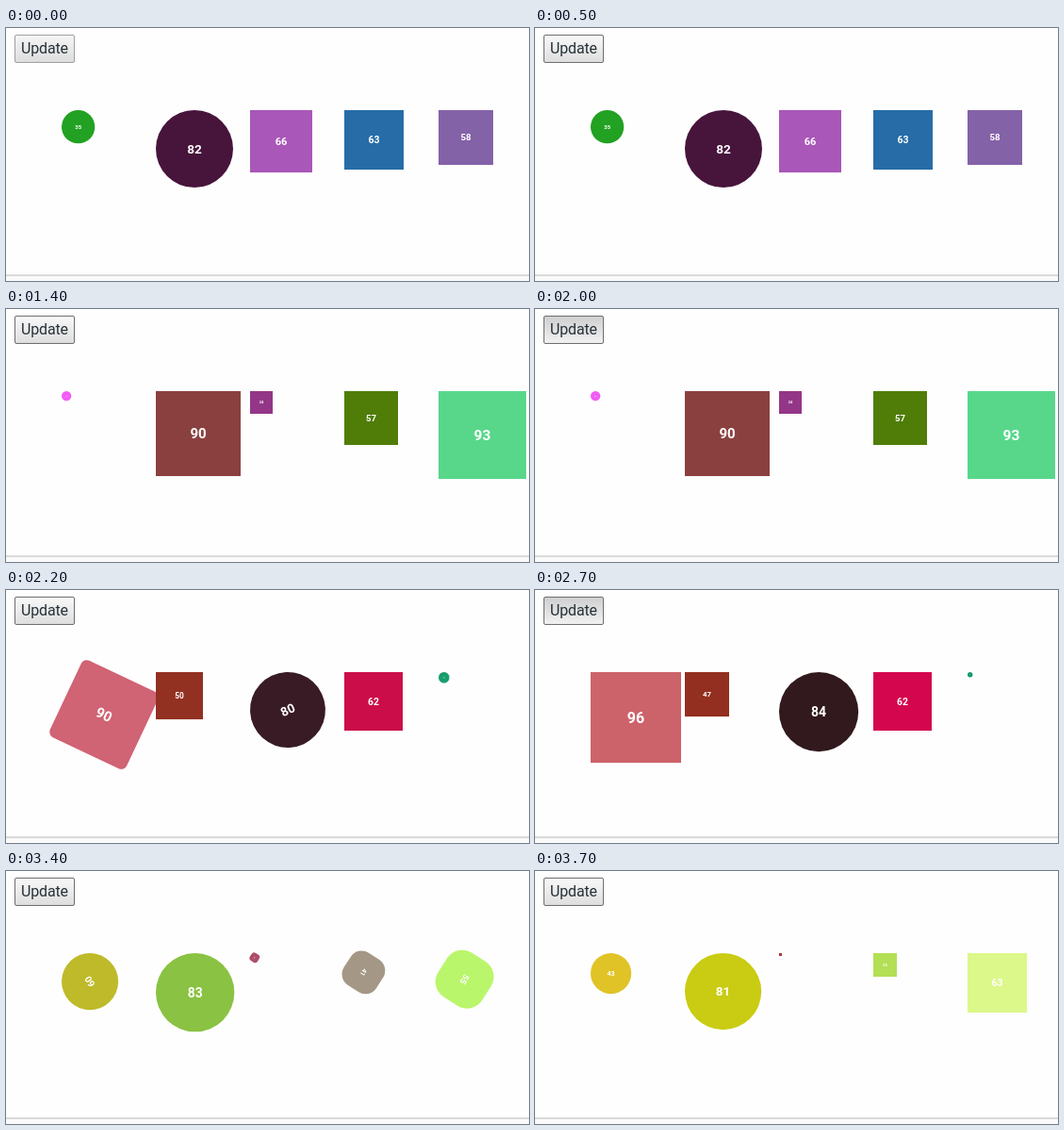
An HTML page with a canvas that plays this animation: 555x268 px, repeating every 4600 ms.

```html
<!DOCTYPE html>
<html lang="en">
<head>
<meta charset="utf-8">
<title>Shape transitions</title>
<style>
html, body { margin: 0; width: 100%; height: 100%; overflow: hidden; background: #fefefe; }
canvas { display: block; }
</style>
</head>
<body>
<canvas id="stage" width="555" height="268"></canvas>
<script>
const ctx = document.getElementById('stage').getContext('2d');
const LOOP = 4600;
const LEFT = 59, TOP = 87, GAP = 100;

const circle = (size, rgb) => ({ size, rgb, radius: 1, turn: 360 });
const square = (size, rgb) => ({ size, rgb, radius: 0, turn: 0 });

// The five shapes after each update
const states = [
  [circle(35.3, [34, 161, 34]), circle(82, [71, 20, 59]), square(66.4, [169, 87, 184]),
    square(62.6, [39, 108, 167]), square(58, [132, 98, 168])],
  [circle(10.3, [242, 92, 245]), square(90, [139, 64, 64]), square(24, [147, 54, 136]),
    square(56.5, [79, 125, 8]), square(93, [88, 215, 139])],
  [square(96, [205, 99, 106]), square(47, [147, 47, 32]), circle(84.2, [49, 25, 29]),
    square(62.2, [212, 6, 78]), circle(5.4, [18, 154, 105])],
  [square(92.9, [123, 170, 48]), circle(87.5, [16, 176, 161]), circle(22.3, [183, 123, 218]),
    circle(70.6, [138, 11, 228]), circle(40.3, [121, 241, 46])],
  [circle(43.2, [224, 195, 38]), circle(81.2, [201, 204, 18]), square(3, [168, 56, 50]),
    square(25.4, [179, 223, 85]), square(63, [220, 248, 138])]
];

// Each update advances in 100 ms ticks; ticks hold linear progress
const updates = [
  { start: 1200, ticks: [0.515, 0.78, 1] },
  { start: 2100, ticks: [0.388, 0.74, 1] },
  { start: 2800, ticks: [0.4, 0.747, 1] },
  { start: 3400, ticks: [0.56, 0.8, 1] }
];
const presses = [2000, 2700, 3300];
const HOVER = 500;

const mix = (a, b, t) => a + (b - a) * t;
const easeCubic = u => u < 0.5 ? 4 * u ** 3 : 1 - 4 * (1 - u) ** 3;

function blend(a, b, t) {
  return {
    size: mix(a.size, b.size, t),
    radius: mix(a.radius, b.radius, t),
    turn: mix(a.turn, b.turn, t),
    rgb: a.rgb.map((c, i) => Math.round(mix(c, b.rgb[i], t)))
  };
}

function shapesAt(time) {
  let i = updates.length - 1;
  while (i >= 0 && time < updates[i].start) i--;
  if (i < 0) return states[0];
  const { start, ticks } = updates[i];
  const tick = Math.min(ticks.length - 1, Math.floor((time - start) / 100));
  const t = easeCubic(ticks[tick]);
  return states[i].map((shape, k) => blend(shape, states[i + 1][k], t));
}

function drawShape(shape, index) {
  const turned = shape.turn % 360 !== 0;
  const size = turned || shape.radius > 0 ? shape.size : Math.round(shape.size);
  const half = size / 2;
  ctx.save();
  ctx.translate(LEFT + GAP * index + half, TOP + half);
  ctx.rotate(shape.turn * Math.PI / 180);
  ctx.fillStyle = `rgb(${shape.rgb})`;
  ctx.beginPath();
  ctx.roundRect(-half, -half, size, size, Math.min(0.5, shape.radius) * size);
  ctx.fill();
  ctx.fillStyle = '#fff';
  ctx.font = `bold ${size / 6}px Roboto, sans-serif`;
  ctx.textAlign = 'center';
  ctx.fillText(Math.round(shape.size), 0, size / 6 * 0.35);
  ctx.restore();
}

function drawButton(time) {
  const pressed = presses.some(p => time >= p && time < p + 100);
  const hover = time >= HOVER;
  const [from, to] = pressed ? ['#cfcfd1', '#f1f1f1'] : hover ? ['#f8f8f8', '#dedede'] : ['#f5f5f5', '#dddddd'];
  const fill = ctx.createLinearGradient(0, 8, 0, 36);
  fill.addColorStop(0, from);
  fill.addColorStop(1, to);
  ctx.beginPath();
  ctx.roundRect(9.5, 7.5, 63, 29, 1.5);
  ctx.fillStyle = fill;
  ctx.fill();
  ctx.strokeStyle = hover ? '#6e6e6e' : '#a0a0a0';
  ctx.lineWidth = 1;
  ctx.stroke();
  ctx.fillStyle = '#263238';
  ctx.font = '16px Roboto, sans-serif';
  ctx.letterSpacing = '-0.15px';
  ctx.textAlign = 'left';
  ctx.fillText('Update', 16, 27);
  ctx.letterSpacing = '0px';
}

function drawPage() {
  ctx.fillStyle = '#fefefe';
  ctx.fillRect(0, 0, 555, 268);
  ctx.fillStyle = '#d6d6d6';
  ctx.fillRect(0, 261, 555, 1);
  ctx.fillStyle = '#dedede';
  ctx.fillRect(0, 262, 555, 1);
  ctx.fillStyle = '#fafafa';
  ctx.fillRect(0, 263, 555, 5);
}

const begin = performance.now();

function render() {
  const time = (performance.now() - begin) % LOOP;
  drawPage();
  drawButton(time);
  shapesAt(time).forEach(drawShape);
  requestAnimationFrame(render);
}

render();
</script>
</body>
</html>
```
